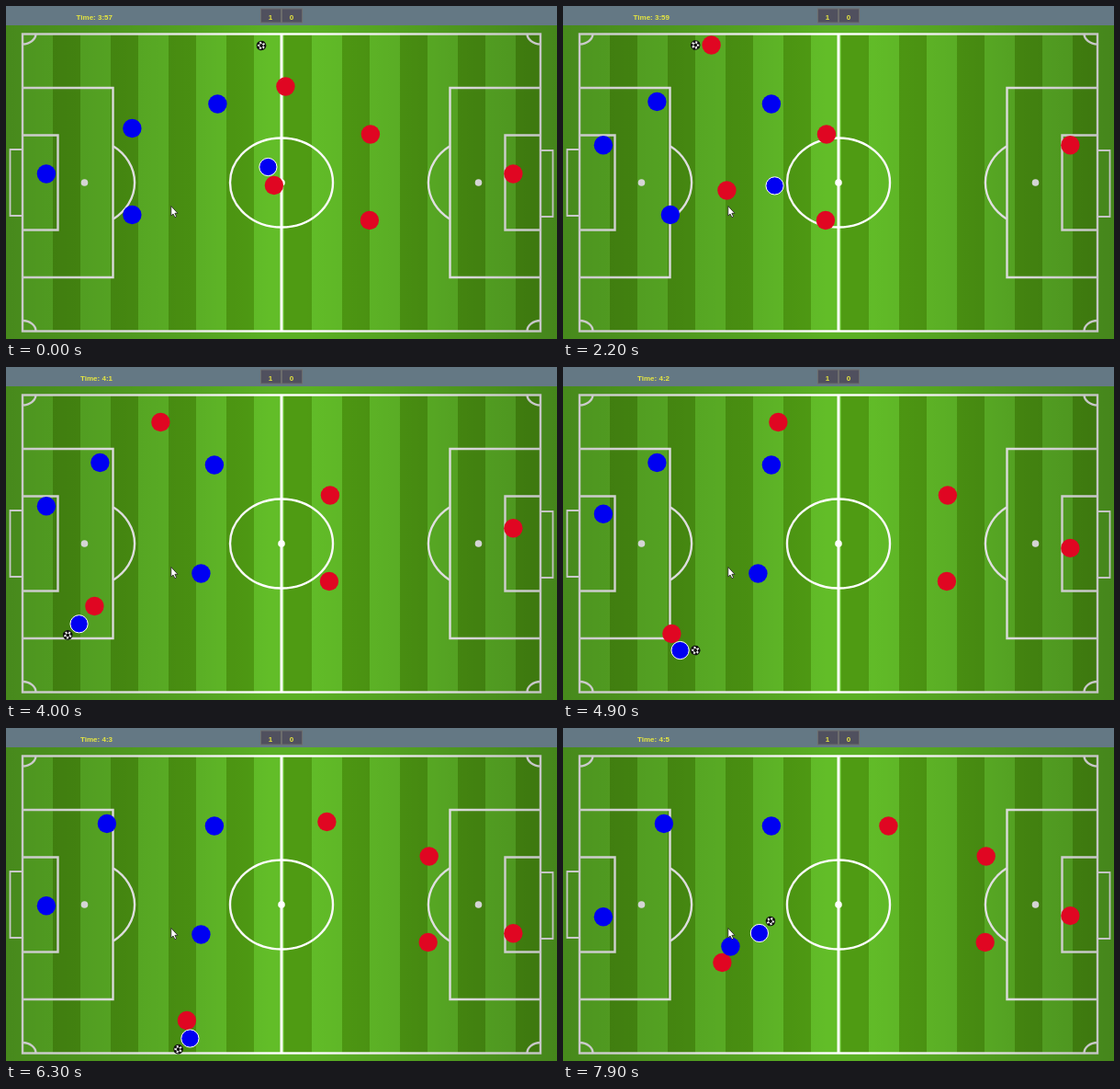
These frames come from a looping animation (600x362 px, 8000 ms). An HTML page:

```html
<!DOCTYPE html>
<html lang="en">
<head>
<meta charset="utf-8">
<title>Football match</title>
<style>
  html, body { margin: 0; width: 100%; height: 100%; overflow: hidden; background: #4d961c; }
  svg { display: block; width: 600px; height: 362px; }
  text { font: bold 8px "Liberation Sans", Arial, sans-serif; fill: #e6e640; }
  .lines { fill: none; stroke: #fff; stroke-width: 2.4; }
  .spot { fill: #fff; stroke: none; }
  .box { fill: #50505e; stroke: #6c6c6c; }
  .red { fill: #e00622; }
  .blue { fill: #0000f2; }
  .active { stroke: #fff; stroke-width: 1; r: 9.6px; }
</style>
</head>
<body>
<svg viewBox="0 0 600 362">
  <defs>
    <pattern id="mown" x="18" width="63" height="362" patternUnits="userSpaceOnUse">
      <rect width="33" height="362" fill="#62bd28"/>
      <rect x="33" width="30" height="362" fill="#4f9b13"/>
    </pattern>
    <linearGradient id="shade">
      <stop offset="0" stop-opacity=".22"/>
      <stop offset=".18" stop-opacity=".15"/>
      <stop offset=".34" stop-opacity=".08"/>
      <stop offset=".48" stop-opacity="0"/>
      <stop offset=".54" stop-opacity="0"/>
      <stop offset=".7" stop-opacity=".08"/>
      <stop offset=".84" stop-opacity=".16"/>
      <stop offset="1" stop-opacity=".24"/>
    </linearGradient>
    <g id="half">
      <path d="M18 89H116.500V295H18M18 140.500H56.500V243.500H18"/>
      <path d="M117 152.500A55 48.500 0 0 1 117 231.500"/>
      <path d="M32.500 30A14.500 11.500 0 0 1 18 41.500M18 342A14.500 11.500 0 0 1 32.500 353.500"/>
      <circle class="spot" cx="85.500" cy="192" r="3.800"/>
    </g>
    <path id="goal" d="M18 156H4.500V228H18" stroke-width="1.800"/>
  </defs>

  <rect y="20" width="600" height="342" fill="#5bb024"/>
  <rect x="18" y="31" width="564" height="322" fill="url(#mown)"/>
  <g class="lines">
    <rect x="18" y="30.500" width="564" height="323"/>
    <path d="M300 30V353" stroke-width="3"/>
    <ellipse cx="300" cy="192" rx="56" ry="48.500"/>
    <circle class="spot" cx="300" cy="192" r="3.800"/>
    <use href="#half"/>
    <use href="#half" transform="matrix(-1 0 0 1 600 0)"/>
    <use href="#goal"/>
    <use href="#goal" transform="matrix(-1 0 0 1 600 1)"/>
  </g>
  <rect y="20" width="600" height="342" fill="url(#shade)"/>

  <rect width="600" height="21" fill="#647884"/>
  <rect class="box" x="277.500" y="3" width="22" height="15"/>
  <rect class="box" x="300.500" y="3" width="22" height="15"/>
  <text x="288" y="14.500" text-anchor="middle">1</text>
  <text x="311" y="14.500" text-anchor="middle">0</text>
  <text id="clock" x="116" y="14.500" text-anchor="end">Time: 3:57</text>

  <g id="players" transform="translate(.4 0)"></g>
  <g id="ball">
    <circle r="4.700" fill="#f4f4f4" stroke="#111" stroke-width="1.200"/>
    <path id="patches" fill="#111"/>
  </g>
  <path d="M179.800 217.500V228L182 226L184 229.800L185.600 229L183.900 225.300H187Z"
        fill="#fff" stroke="#222" stroke-width=".8"/>
</svg>
<script>
const LOOP = 8000, STEP = 100;
const KEEPER_SPEED = 24, RUN_SPEED = 73.3, REACH = 17;
const $ = id => document.getElementById(id);
const clock = $("clock"), ball = $("ball");
const players = [];

// Seconds of the window from a to b that have passed at time t.
const spent = (t, a, b) => Math.min(Math.max(t, a), b) - a;

// Straight runs between [seconds, x, y] points.
const path = (...keys) => t => {
  let [, x, y] = keys[0];
  for (let i = 1; i < keys.length; i++) {
    const [t0, x0, y0] = keys[i - 1], [t1, x1, y1] = keys[i];
    const u = spent(t, t0, t1) / (t1 - t0);
    x += (x1 - x0) * u;
    y += (y1 - y0) * u;
  }
  return [x, y];
};

// Keepers drift up with the ball, then down from `fall` to `rest`, then up from `rise`.
const keeper = (x, fall, rest, rise) => t => [x, 182.5 + KEEPER_SPEED *
  (spent(t, fall, rest) - spent(t, .6, 1.9) - spent(t, rise, 8))];

// Backs push up to the halfway line and retreat together.
const redBack = (x, y) => t =>
  [x + RUN_SPEED * (spent(t, 3.1, 5.47) - spent(t, .5, 2)), y];

function player(team, move) {
  const dot = document.createElementNS("http://www.w3.org/2000/svg", "circle");
  dot.setAttribute("r", 10.2);
  dot.setAttribute("class", team);
  $("players").append(dot);
  const p = { dot, move };
  players.push(p);
  return p;
}

player("red", keeper(552, 3, 6, 7.1));
player("red", redBack(396.5, 139.5));
player("red", redBack(395.5, 233));
const winger = player("red", path([0, 304, 87.5], [.85, 259.5, 42.5], [1.3, 227, 42.5],
  [2.77, 119.5, 42.5], [3.1, 102, 60], [4.9, 234, 60], [6.3, 349, 102], [6.4, 354, 106.5]));
player("red", path([.6, 291.5, 195], [1.3, 244, 200.5], [3.1, 112, 200.5], [4, 96, 260],
  [4.9, 118, 290], [6.3, 196.5, 318], [7, 172, 316], [7.9, 173, 255]));

player("blue", keeper(43.5, 4.55, 7.35, 7.35));
player("blue", path([.8, 137, 133], [1.3, 120, 129.5], [2, 102, 104], [5.4, 102, 104],
  [5.5, 109.5, 104]));
player("blue", path([1.3, 230, 106.5], [1.4, 226.5, 106.5]));
const back = player("blue", path([.8, 137, 227], [1.4, 116.5, 227], [3.1, 116.5, 227],
  [3.3, 116, 242], [4.06, 76, 282.5], [4.55, 101.5, 308], [5.73, 188, 308],
  [6.13, 209, 329], [6.3, 200, 337.5], [7.9, 182, 237.5]));
const mid = player("blue", path([0, 285, 175], [1.3, 253.5, 158], [2.9, 212, 224.5],
  [7.87, 212, 224.5], [7.9, 213.5, 223]));

const loose = path([0, 278, 43], [.85, 242.5, 42.5], [2.3, 137, 42.5], [2.75, 51, 145],
  [2.95, 51, 145], [3.35, 108.5, 261], [6.9, 190, 294], [7.2, 226, 210]);

// A dribbled ball stays one reach ahead of the runner.
function dribble({ move }, t) {
  const [x, y] = move(t), [px, py] = move(t - .15);
  const k = REACH / Math.hypot(x - px, y - py);
  return [x + (x - px) * k, y + (y - py) * k];
}

function ballAt(t) {
  if (t >= .85 && t < 2.3) return dribble(winger, t);
  if (t >= 3.35 && t < 6.9) return dribble(back, t);
  return loose(t);
}

const disc = (x, y, r) => `M${x - r} ${y}a${r} ${r} 0 1 0 ${2 * r} 0a${r} ${r} 0 1 0 ${-2 * r} 0`;
let patches = disc(0, 0, 1.9);
for (let i = 0; i < 5; i++) {
  const a = i * Math.PI * 0.4;
  patches += disc(3.8 * Math.cos(a), 3.8 * Math.sin(a), 1.4);
}
$("patches").setAttribute("d", patches);

function draw() {
  const t = Math.floor(performance.now() % LOOP / STEP) * STEP / 1000;
  const active = t >= 3.2 && t < 6.9 ? back : mid;
  for (const p of players) {
    const [x, y] = p.move(t);
    p.dot.setAttribute("cx", x);
    p.dot.setAttribute("cy", y);
    p.dot.classList.toggle("active", p === active);
  }
  const [x, y] = ballAt(t);
  ball.setAttribute("transform", `translate(${x} ${y}) rotate(${(x + y) * 11})`);
  const s = Math.floor(237.4 + t);
  clock.textContent = `Time: ${Math.floor(s / 60)}:${s % 60}`;
  requestAnimationFrame(draw);
}
draw();
</script>
</body>
</html>
```
